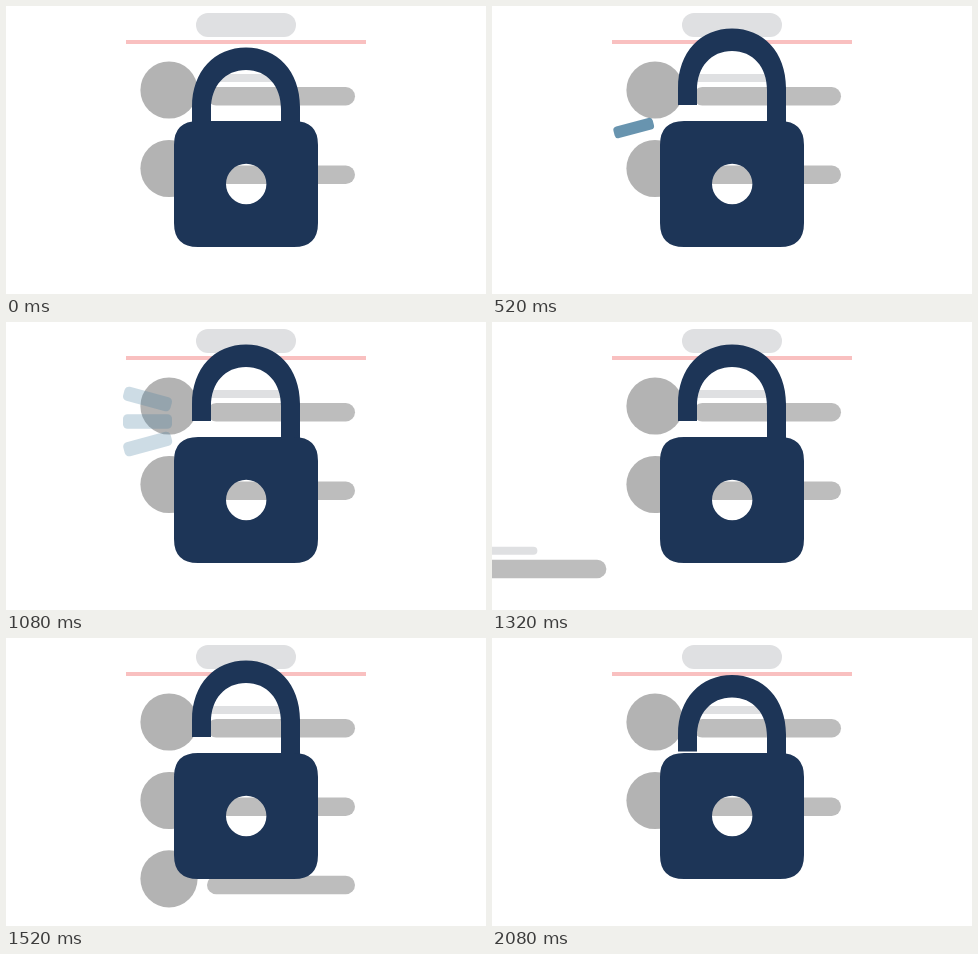
Write an HTML page that moves like this. It is 480 by 288 pixels and loops after 2120 ms.

```html
<!DOCTYPE html>
<html lang="en">
<head>
<meta charset="utf-8">
<title>Unlocking list</title>
<style>
  html, body { margin: 0; width: 100%; height: 100%; overflow: hidden; background: #fff; }
  svg { display: block; width: 100%; height: 100%; }
</style>
</head>
<body>
<svg viewBox="0 0 480 288">
  <defs>
    <g id="row">
      <circle cx="163" cy="0" r="28.6" fill="#b3b3b3"/>
      <rect x="201" y="-16" width="79" height="8" rx="4" fill="#dfe0e2"/>
      <rect x="201" y="-3" width="148" height="18.5" rx="9.25" fill="#bdbdbd"/>
    </g>
    <rect id="ray" x="-24.5" y="-7.2" width="49" height="14.4" rx="4.5" fill="#457b9d"/>
  </defs>

  <rect x="190" y="7" width="100" height="24" rx="12" fill="#dfe0e2"/>
  <rect x="120" y="34" width="240" height="4" fill="#f9c0c0"/>
  <use href="#row" y="84"/>
  <use href="#row" y="162.5"/>
  <use href="#row" y="240.8" id="newRow"/>

  <use href="#ray" class="ray"/>
  <use href="#ray" class="ray"/>
  <use href="#ray" class="ray"/>

  <g fill="#1d3557">
    <path id="shackle" d="M186 118V101C186 65 209 41.5 240 41.5S294 65 294 101V140H275V103
      C275 80 261 64 240 64S205 80 205 103V118Z"/>
    <path fill-rule="evenodd" d="M192 115H288Q312 115 312 139V217Q312 241 288 241H192
      Q168 241 168 217V139Q168 115 192 115Z
      M220 178a20.2 20.2 0 1 0 40.4 0a20.2 20.2 0 1 0 -40.4 0Z"/>
  </g>
</svg>
<script>
  const LOOP = 2120;
  const LIFT = 19;
  const RAY_POSES = [[141.7, 122, -15], [141.5, 99.5, 0], [141.5, 77, 15]];

  const shackle = document.getElementById('shackle');
  const newRow = document.getElementById('newRow');
  const rays = document.querySelectorAll('.ray');

  const progress = (t, start, end) => Math.min(1, Math.max(0, (t - start) / (end - start)));
  const easeInOut = p => (1 - Math.cos(Math.PI * p)) / 2;
  const easeOutBack = p => 1 + 2.7 * (p - 1) ** 3 + 1.7 * (p - 1) ** 2;

  function rowOffset(t) {
    if (t < 1480) return -480 + 486 * easeInOut(progress(t, 1160, 1480));
    return 6 * (1 - progress(t, 1480, 1520));
  }

  function draw(t) {
    const open = easeInOut(progress(t, 360, 480)) - easeInOut(progress(t, 2000, 2120));
    shackle.setAttribute('transform', `translate(0 ${-LIFT * open})`);

    const fade = 1 - progress(t, 880, 1166);
    rays.forEach((ray, i) => {
      const start = 480 + 120 * i;
      const p = progress(t, start, start + 160);
      const [x, y, angle] = RAY_POSES[i];
      const scale = p > 0 ? Math.max(0, easeOutBack(p)) : 0;
      ray.setAttribute('transform', `translate(${x} ${y}) rotate(${angle}) scale(${scale})`);
      ray.setAttribute('opacity', 0.9 * fade * Math.min(1, p * 3.5));
    });

    newRow.setAttribute('transform', `translate(${rowOffset(t)} 0)`);
    newRow.setAttribute('visibility', t < 2030 ? 'visible' : 'hidden');
  }

  const startTime = performance.now();
  function tick() {
    draw((performance.now() - startTime) % LOOP);
    requestAnimationFrame(tick);
  }
  draw(0);
  requestAnimationFrame(tick);
</script>
</body>
</html>
```
